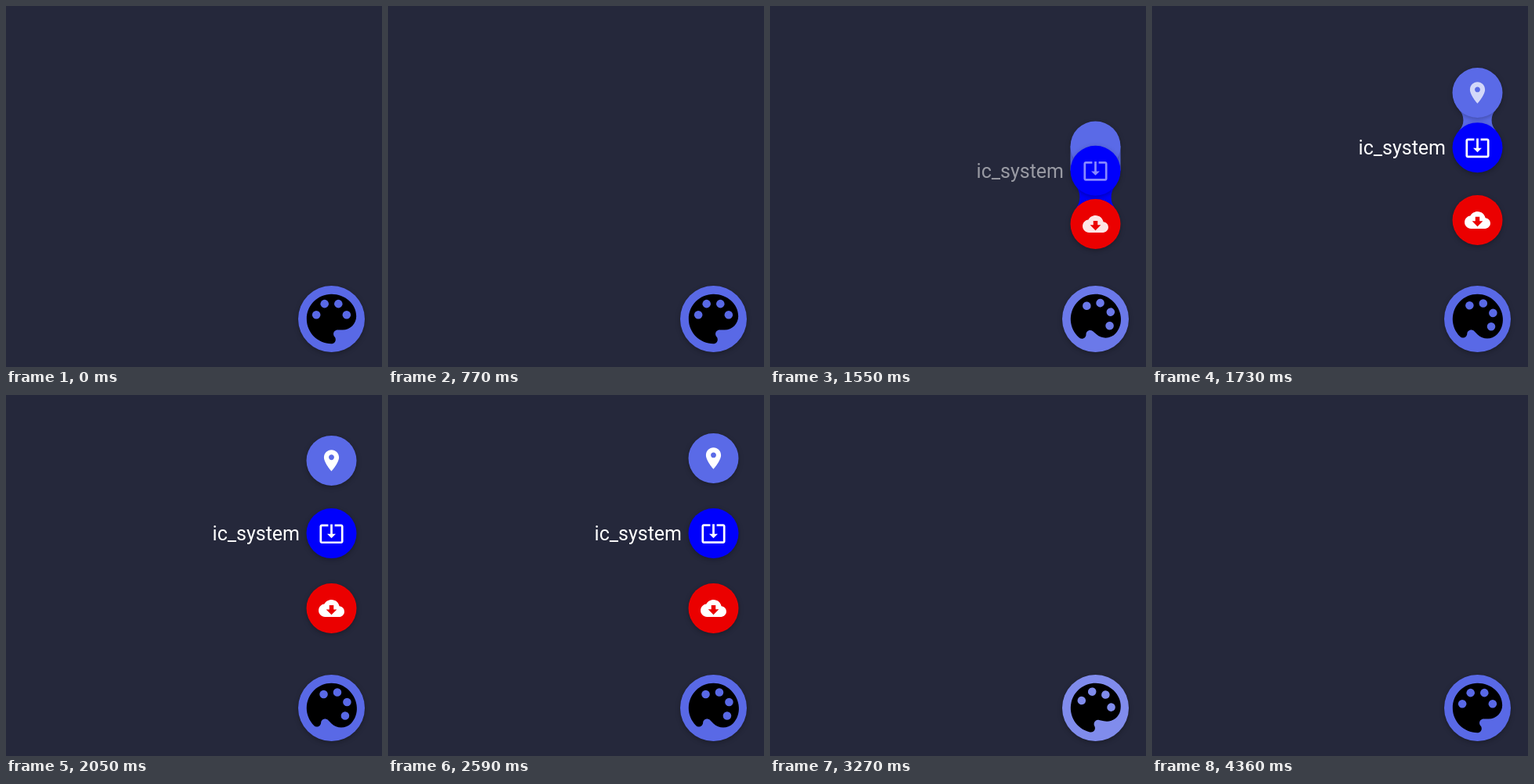
Recreate the animation shown at these times as an HTML page with a canvas. Size 480 px wide and 462 px high, loop 5.31 s.

```html
<!DOCTYPE html>
<html lang="en">
<head>
<meta charset="utf-8">
<title>Gooey action menu</title>
<style>
  html, body { margin: 0; width: 100%; height: 100%; overflow: hidden; background: #25283b; }
  canvas { display: block; width: 480px; height: 462px; }
</style>
</head>
<body>
<canvas id="stage" width="480" height="462"></canvas>
<script>
const ctx = document.getElementById('stage').getContext('2d');
const LOOP = 5310;
const CX = 415.5, FAB_Y = 400.5, FAB_R = 42.5, R = 32;
const OPEN_SPIN = 1268, CLOSE_SPIN = 3094;

const PALETTE = new Path2D('M12 3c-4.97 0-9 4.03-9 9s4.03 9 9 9c.83 0 1.5-.67 1.5-1.5 0-.39-.15-.74-.39-1.01-.23-.26-.38-.61-.38-.99 0-.83.67-1.5 1.5-1.5H16c2.76 0 5-2.24 5-5 0-4.42-4.03-8-9-8z');
const DOTS = [[6.5, 10.5], [9.5, 6.5], [14.5, 6.5], [17.5, 10.5]];

// Listed from the nearest to the farthest; speed is the spring rate per ms.
const items = [
  { rise: 127.5, color: '#eb0000', start: 1146, speed: .0119, close: 2990,
    icon: new Path2D('M19.35 10.04C18.67 6.59 15.64 4 12 4 9.11 4 6.6 5.64 5.35 8.04 2.34 8.36 0 10.91 0 14c0 3.31 2.69 6 6 6h13c2.76 0 5-2.24 5-5 0-2.64-2.05-4.78-4.65-4.96zM17 13l-5 5-5-5h3V9h4v4h3z') },
  { rise: 223.5, color: '#0000fc', start: 1314, speed: .0142, close: 2972, label: 'ic_system',
    icon: new Path2D('M12 16.5l4-4h-3v-9h-2v9H8l4 4zm9-13h-6v1.99h6v14.03H3V5.49h6V3.5H3c-1.1 0-2 .9-2 2v14c0 1.1.9 2 2 2h18c1.1 0 2-.9 2-2v-14c0-1.1-.9-2-2-2z') },
  { rise: 319.5, color: '#5a6ae7', start: 1275, speed: .0087, close: 2955,
    icon: new Path2D('M12 2C8.13 2 5 5.13 5 9c0 5.25 7 13 7 13s7-7.75 7-13c0-3.87-3.13-7-7-7zm0 9.5c-1.38 0-2.5-1.12-2.5-2.5s1.12-2.5 2.5-2.5 2.5 1.12 2.5 2.5-1.12 2.5-2.5 2.5z') }
];

const clamp = v => Math.min(1, Math.max(0, v));
const smooth = v => v * v * (3 - 2 * v);

function spring(t, start, speed) {
  const x = Math.max(0, t - start) * speed;
  return 1 - (1 + x) * Math.exp(-x);
}

function progress(item, t) {
  return spring(t, item.start, item.speed) * (1 - smooth(clamp((t - item.close) / 265)));
}

function disc(x, y, r, color, shadow) {
  ctx.save();
  if (shadow) {
    ctx.shadowColor = 'rgba(0,0,0,.28)';
    ctx.shadowBlur = 6;
    ctx.shadowOffsetY = 2;
  }
  ctx.fillStyle = color;
  ctx.beginPath();
  ctx.arc(x, y, r, 0, Math.PI * 2);
  ctx.fill();
  ctx.restore();
}

// Liquid bridge between two equal circles, thinning as they part.
function neck(top, bottom, color) {
  const d = bottom - top, mid = (top + bottom) / 2;
  if (d <= 0 || d > 79) return;
  ctx.fillStyle = color;
  if (d < 45) {
    ctx.fillRect(CX - R, top, R * 2, d);
    return;
  }
  const half = R * (1 - ((d - 40) / 42) ** 2.5);
  const f = (d * d / 4 + half * half - R * R) / (2 * (R - half));
  const h = half + f, a = Math.atan2(d / 2, h);
  ctx.beginPath();
  ctx.arc(CX + h, mid, f, Math.PI + a, Math.PI - a, true);
  ctx.arc(CX - h, mid, f, a, -a, true);
  ctx.closePath();
  ctx.fill();
}

function drawItem(item, y, p) {
  disc(CX, y, R, item.color, true);
  const alpha = clamp((p - .7) / .28);
  if (!alpha) return;
  ctx.save();
  ctx.globalAlpha = alpha;
  ctx.fillStyle = '#fff';
  if (item.label) {
    ctx.font = '25px Roboto, Inter, sans-serif';
    ctx.textAlign = 'right';
    ctx.fillText(item.label, 375, y + 9);
  }
  ctx.translate(CX, y);
  ctx.scale(1.37, 1.37);
  ctx.translate(-12, -12);
  ctx.fill(item.icon);
  ctx.restore();
}

function flash(t, start) {
  const dt = t - start;
  return .45 * clamp(dt / 80) * clamp(1 - (dt - 90) / 370);
}

function drawFab(t) {
  const glow = flash(t, 1178) + flash(t, 3004);
  const mix = c => Math.round(c + (255 - c) * glow);
  const color = `rgb(${mix(89)},${mix(105)},${mix(230)})`;
  const turn = spring(t, OPEN_SPIN, .0142) - spring(t, CLOSE_SPIN, .0142);
  disc(CX, FAB_Y, FAB_R, color, true);
  ctx.save();
  ctx.translate(CX, FAB_Y);
  ctx.rotate(turn * Math.PI / 4);
  ctx.scale(3.52, 3.52);
  ctx.translate(-12, -12);
  ctx.fillStyle = '#000';
  ctx.fill(PALETTE);
  for (const [x, y] of DOTS) disc(x, y, 1.5, color);
  ctx.restore();
}

function draw(t) {
  ctx.fillStyle = '#25283b';
  ctx.fillRect(0, 0, 480, 462);
  const ps = items.map(item => progress(item, t));
  const ys = items.map((item, i) => FAB_Y - item.rise * ps[i]);
  for (let i = items.length - 1; i >= 0; i--) {
    if (ps[i] < .001) continue;
    neck(ys[i], i ? ys[i - 1] : FAB_Y, items[i].color);
    drawItem(items[i], ys[i], ps[i]);
  }
  drawFab(t);
}

const begin = performance.now();
function tick() {
  draw((performance.now() - begin) % LOOP);
  requestAnimationFrame(tick);
}
tick();
</script>
</body>
</html>
```
